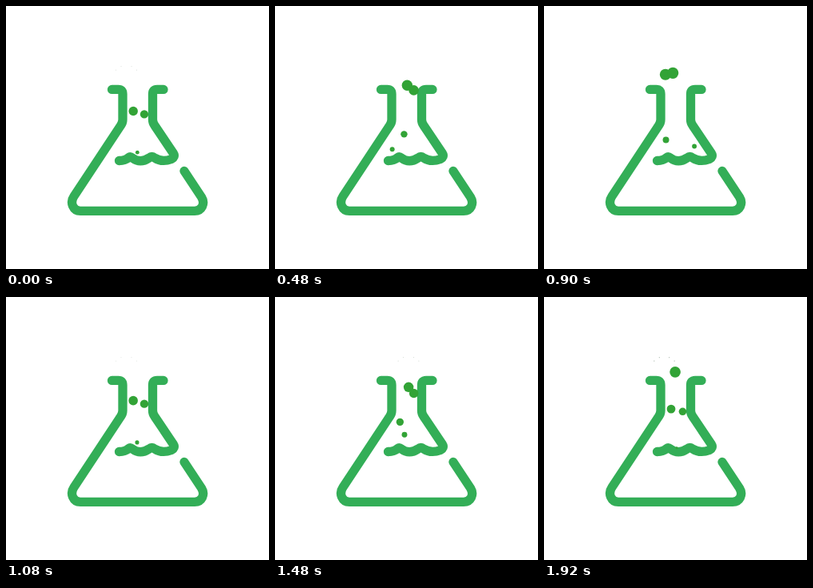
An HTML page for the animation above (1940 ms loop, 329 by 329 pixels).

```html
<!DOCTYPE html>
<html lang="en">
<head>
<meta charset="utf-8">
<title>Bubbling flask</title>
<style>
  html, body { margin: 0; width: 100%; height: 100%; overflow: hidden; background: #fff; }
  svg { display: block; width: 100vw; height: 100vh; }
  .glass {
    fill: none; stroke: #33ae57; stroke-width: 11.3; stroke-linecap: round; stroke-linejoin: round;
    filter: blur(0.4px);
  }
  #bubbles { fill: #32a336; }
  #drops { fill: #3c5c40; }
</style>
</head>
<body>
<svg viewBox="0 0 329 329">
  <g class="glass">
    <path d="M132.5 104.4H140.5Q146 104.4 146 110V142Q146 146 143.5 149.5L85 238C79.5 246 84 256.3 93 256.3H236C245 256.3 249.5 247 244.5 239L223 206.5"/>
    <path d="M197 104.4H189Q183.5 104.4 183.5 110V142Q183.5 146 186 149.5L209.5 184.5Q212 188.5 207 191.5Q195 196 186 190Q182.5 187 179 190Q168 197.5 158 190Q155.5 188 153.5 189.5Q149 193.5 141.5 193.5"/>
  </g>
  <g id="bubbles"></g>
  <g id="drops"></g>
</svg>
<script>
  const LOOP = 1940, STEP = 20, POP = 160;
  const BOTTOM = 192, TOP = 80, DROPS = 4;

  // A bubble drifts from x `from` to `to`, bent by `arc` (half wave) and `sway` (full wave);
  // `ease` bends its rise, `lead` is how long before its beat it forms.
  const pulse = [0, 340, 1072, 1412, 1955];
  const streams = [
    { beats: [-355, 0, 717, 1072, 1595, 1958], lead: 310, life: 515,
      from: 139, to: 150.5, arc: 14, sway: 0, ease: -0.065 },
    { beats: pulse, lead: 55, life: 635,
      from: 167, to: 160, arc: 1, sway: -4.5, ease: -0.03 },
    { beats: pulse, lead: 240, life: 505,
      from: 202, to: 167, arc: -11.5, sway: -6, ease: 0.03 }
  ];

  const mix = (a, b, k) => a + (b - a) * k;
  const wave = turns => Math.sin(2 * Math.PI * turns);

  function pool(id) {
    const group = document.getElementById(id), dots = [];
    let used = 0;
    return {
      put(x, y, r) {
        if (!dots[used]) {
          dots[used] = document.createElementNS(group.namespaceURI, 'circle');
          group.append(dots[used]);
        }
        const dot = dots[used++];
        dot.setAttribute('cx', x);
        dot.setAttribute('cy', y);
        dot.setAttribute('r', r);
      },
      finish() {
        for (let i = used; i < dots.length; i++) dots[i].setAttribute('r', 0);
        used = 0;
      }
    };
  }
  const bubbles = pool('bubbles'), drops = pool('drops');

  function rise({ from, to, arc, sway, ease }, k) {
    const x = mix(from, to, k) + arc * wave(k / 2) + sway * wave(k);
    const y = mix(BOTTOM, TOP, k + ease * wave(k / 2));
    bubbles.put(x, y, 7.2 * k ** 0.45);
  }

  function burst(x, k) {
    const spread = 1 - 0.5 * (1 - k) ** 2;
    for (let i = 0; i < DROPS; i++) {
      const a = Math.PI * i / (DROPS - 1);
      drops.put(x + 13 * spread * Math.cos(a), TOP - 5 * spread * Math.sin(a), 1.2 - k);
    }
  }

  function draw(t) {
    for (const stream of streams) {
      for (const beat of stream.beats) {
        const age = t - beat + stream.lead, popAge = age - stream.life;
        if (age < 0 || popAge >= POP) continue;
        if (popAge < 0) rise(stream, age / stream.life);
        else burst(stream.to, popAge / POP);
      }
    }
    bubbles.finish();
    drops.finish();
  }

  const origin = performance.now();
  function tick() {
    const t = (performance.now() - origin) % LOOP;
    draw(Math.floor(t / STEP) * STEP);
    requestAnimationFrame(tick);
  }
  tick();
</script>
</body>
</html>
```
